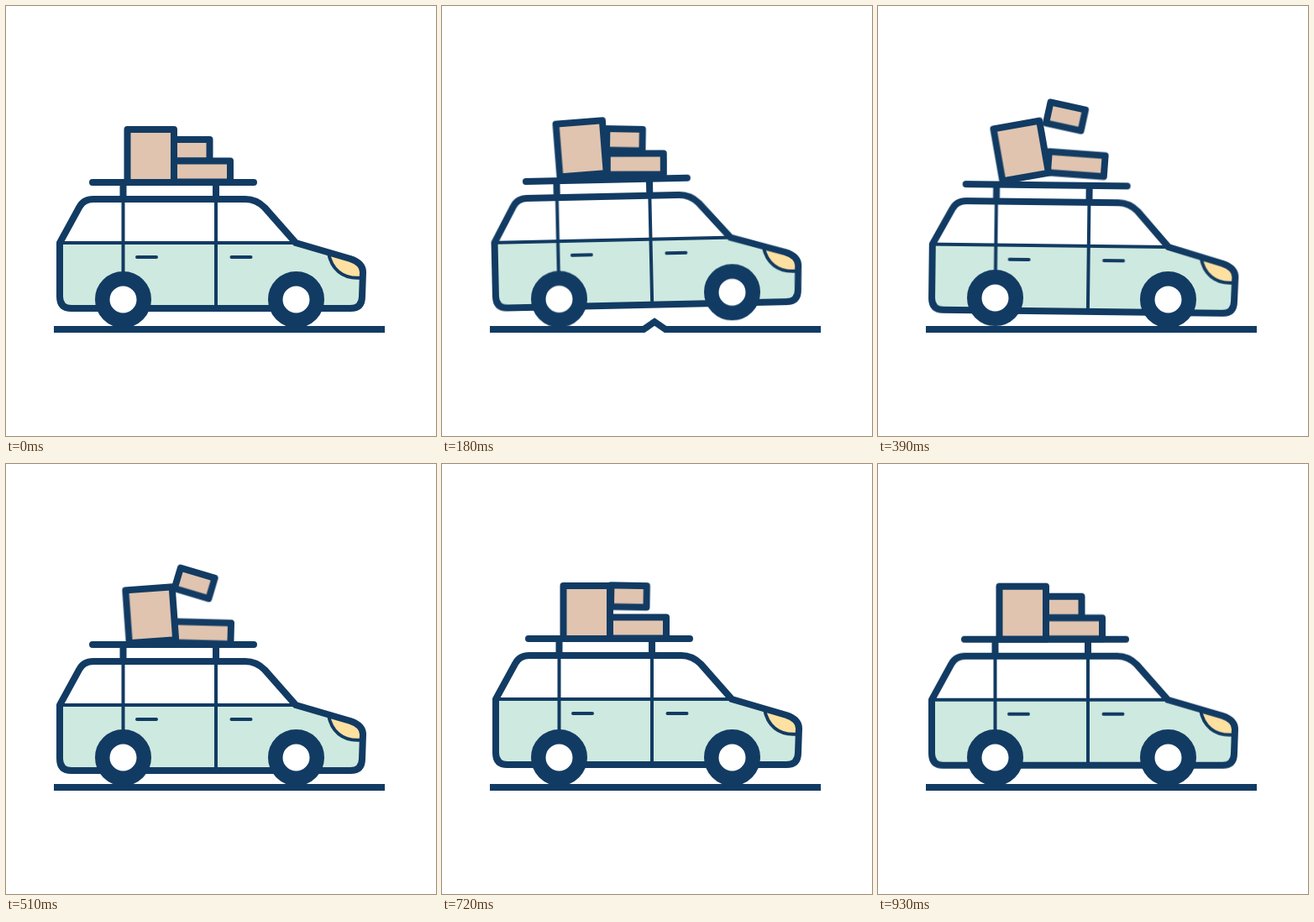
An HTML page for the animation above (960 ms loop, 512 by 512 pixels).

```html
<!DOCTYPE html>
<html lang="en">
<head>
<meta charset="utf-8">
<title>Loaded car on a bumpy road</title>
<style>
  html, body { margin: 0; width: 100%; height: 100%; overflow: hidden; background: #fff; }
  svg { display: block; width: 100vw; height: 100vh; }
  .ink { fill: none; stroke: #123b63; stroke-width: 8; }
  .thin { stroke-width: 4; }
  .round { stroke-linecap: round; stroke-linejoin: round; }
  .box { fill: #e0c4af; }
  .wheel { fill: #fff; stroke-width: 17.5; }

  .move { animation: 960ms linear infinite; }
  #bump { animation-name: bump; }
  #body { animation-name: body; transform-origin: 139.5px 349.5px; }
  #front { animation-name: front; }
  #rear { animation-name: rear; }
  #crate { animation-name: crate; transform-origin: 172.2px 178.5px; }
  #case { animation-name: case; transform-origin: 233.5px 197px; }
  #parcel { animation-name: parcel; transform-origin: 221.3px 171.7px; }

  @keyframes bump {
    from { transform: translateX(512.5px); }
    to { transform: translateX(-863.5px); }
  }
  @keyframes body {
    0% { transform: translateY(0) rotate(0deg); animation-timing-function: ease-in-out; }
    12.5% { transform: translateY(2px) rotate(-3.1deg); }
    28.125% { transform: translateY(-7.5px) rotate(1.4deg); }
    40.625% { transform: translateY(2.5px) rotate(.7deg); }
    53.125% { transform: translateY(5px) rotate(0deg); }
    75% { transform: translateY(-2px) rotate(0deg); }
    96.875%, 100% { transform: translateY(-1.3px) rotate(0deg); }
  }
  @keyframes front {
    0% { transform: translateY(0); animation-timing-function: ease-in-out; }
    12.5%, 15.6% { transform: translateY(-10px); }
    28.125% { transform: translateY(-5px); }
    38%, 100% { transform: translateY(0); }
  }
  @keyframes rear {
    0%, 17% { transform: translateY(0); animation-timing-function: ease-in-out; }
    28.125% { transform: translateY(-10px); }
    40.625% { transform: translateY(-2px); }
    44%, 100% { transform: translateY(0); }
  }
  @keyframes crate {
    0% { transform: translate(0, 0) rotate(0deg); animation-timing-function: ease-in-out; }
    12.5% { transform: translate(-8.9px, -.2px) rotate(-3.1deg); }
    28.125% { transform: translate(-3.2px, -21px) rotate(-6.5deg); }
    40.625% { transform: translate(-2px, -6px) rotate(-10deg); }
    53.125% { transform: translate(0, 1.3px) rotate(-4.1deg); }
    75% { transform: translate(0, -2px) rotate(0deg); }
    96.875%, 100% { transform: translate(0, -1.3px) rotate(0deg); }
  }
  @keyframes case {
    0% { transform: translate(0, 0) rotate(0deg); animation-timing-function: ease-in-out; }
    12.5% { transform: translate(-8px, -3px) rotate(-3.1deg); }
    28.125% { transform: translate(3.8px, -17.5px) rotate(4.2deg); }
    40.625% { transform: translate(2.8px, -8.9px) rotate(4.2deg); }
    53.125% { transform: translate(.7px, 4px) rotate(1.5deg); }
    75% { transform: translate(0, -2px) rotate(0deg); }
    96.875%, 100% { transform: translate(0, -1.3px) rotate(0deg); }
  }
  @keyframes parcel {
    0% { transform: translate(0, 0) rotate(0deg); animation-timing-function: ease-in-out; }
    12.5% { transform: translate(-9.3px, -2.3px) rotate(-3.1deg); }
    28.125% { transform: translate(4.2px, -27.5px) rotate(7deg); }
    40.625% { transform: translate(2.3px, -40.3px) rotate(12.3deg); }
    53.125% { transform: translate(3.4px, -29.8px) rotate(16.7deg); }
    75% { transform: translate(1.2px, -14.3px) rotate(1deg); }
    96.875%, 100% { transform: translate(0, -1.3px) rotate(0deg); }
  }
</style>
</head>
<body>
<svg viewBox="0 0 512 512">
  <clipPath id="road"><rect x="57" y="360" width="394" height="40"/></clipPath>
  <g clip-path="url(#road)">
    <path id="bump" class="move ink" d="M-500 385H-13L0 376L13 385H1400"/>
  </g>

  <g class="ink round">
    <rect id="parcel" class="move box" x="200" y="159" width="42.5" height="25.5"/>
    <rect id="case" class="move box" x="200" y="184.5" width="67" height="25"/>
    <rect id="crate" class="move box" x="144.5" y="147" width="55.5" height="63"/>
  </g>

  <g id="body" class="move">
    <path fill="#fff" d="M64 282L87 240Q92 230 104 230H285Q298 230 308 240L345 282Z"/>
    <path fill="#cee9df" d="M64 282H345L410 301Q425 306 425 317L424 346Q424 360 410 360H78Q64 360 64 346Z"/>
    <path fill="#fee0a1" d="M384 294L410 301Q425 306 425 317V324C400 326 387 312 384 294Z"/>
    <path class="ink thin" d="M384 294C387 312 400 326 424 323.500"/>
    <path class="ink thin" d="M64 282H345M139.500 230V330M250 230V360"/>
    <path class="ink thin round" d="M156 299H179M268.500 299H291.500"/>
    <path class="ink" d="M139.500 210V230M250 210V230"/>
    <path class="ink round" stroke-width="7" d="M103 210H295"/>
    <path class="ink round" d="M64 282L87 240Q92 230 104 230H285Q298 230 308 240L345 282L410 301Q425 306 425 317L424 346Q424 360 410 360H78Q64 360 64 346Z"/>
  </g>

  <circle id="rear" class="move ink wheel" cx="139.500" cy="349.500" r="24.750"/>
  <circle id="front" class="move ink wheel" cx="345.500" cy="349.500" r="24.750"/>
</svg>
</body>
</html>
```
